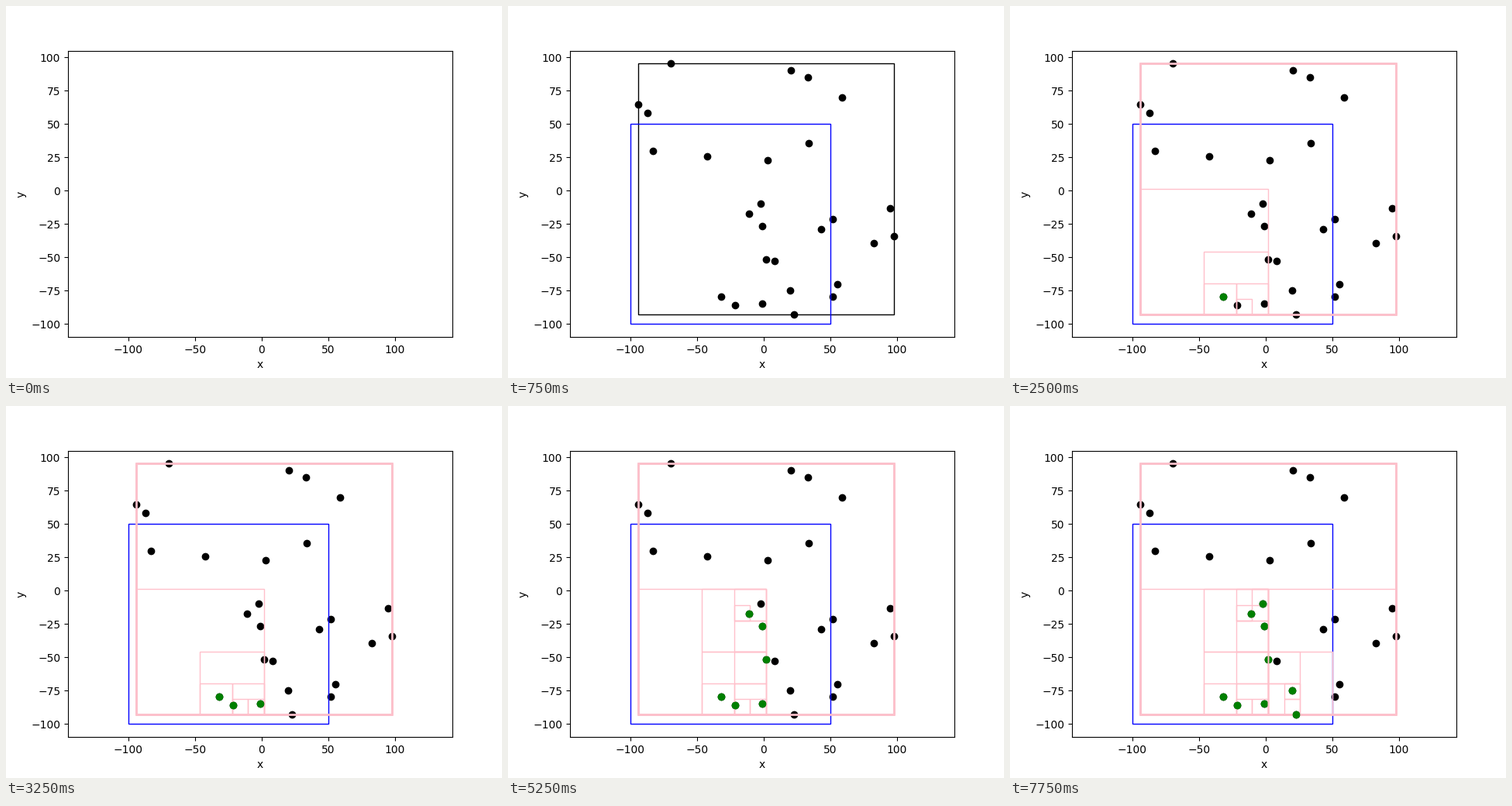
Write a matplotlib script that moves like this. It is 640x480 px and loops after 8 s.

```python
import matplotlib.pyplot as plt
from matplotlib.animation import FuncAnimation
from matplotlib.patches import Rectangle

FRAMES = 32
STEP_MS = 250

POINTS = [
    (-69.5, 95.35), (-94.2, 64.5), (20.6, 90.2), (33.4, 85), (59, 69.9),
    (-87, 58.2), (-82.9, 29.8), (-42.2, 25.6), (3.1, 22.8), (34, 35.5),
    (-2.1, -9.8), (-10.8, -17.3), (-0.9, -26.7), (43.3, -29), (52, -21.4),
    (95, -13.3), (97.9, -34.2), (82.9, -39.5), (1.8, -51.7), (8.4, -52.9),
    (20.1, -74.9), (55.5, -70.3), (52, -79.6), (-31.7, -79.6),
    (-21.2, -86), (-0.9, -84.8), (23, -93),
]
QUERY = (-100, -100, 50, 50)

fig, ax = plt.subplots(figsize=(6.4, 4.8), dpi=100)
ax.set_xlim(-145.24, 143.14)
ax.set_ylim(-109.77, 105.12)
ax.set_xlabel("x")
ax.set_ylabel("y")

steps = []


def next_z():
    return 1 + len(steps) / 200


def add_dots(points, color):
    xs, ys = zip(*points)
    steps.append(ax.scatter(xs, ys, color=color, zorder=next_z()))


def add_box(box, color, width=1):
    x0, y0, x1, y1 = box
    rect = Rectangle((x0, y0), x1 - x0, y1 - y0, fill=False,
                     edgecolor=color, linewidth=width, zorder=next_z())
    steps.append(ax.add_patch(rect))


def overlaps(box):
    return (box[0] <= QUERY[2] and box[2] >= QUERY[0]
            and box[1] <= QUERY[3] and box[3] >= QUERY[1])


def in_query(p):
    return QUERY[0] <= p[0] <= QUERY[2] and QUERY[1] <= p[1] <= QUERY[3]


def search(box, points, width=1):
    """Visit a quadtree node, then its non-empty children from SW to NE."""
    if not points or not overlaps(box) or len(steps) >= FRAMES:
        return
    add_box(box, "pink", width)
    if len(points) == 1:
        if in_query(points[0]):
            add_dots(points, "green")
        return
    x0, y0, x1, y1 = box
    mx, my = (x0 + x1) / 2, (y0 + y1) / 2
    for top in (False, True):
        for right in (False, True):
            child = (mx if right else x0, my if top else y0,
                     x1 if right else mx, y1 if top else my)
            inside = [p for p in points
                      if (p[0] > mx) == right and (p[1] > my) == top]
            search(child, inside)


xs, ys = zip(*POINTS)
bounds = (min(xs), min(ys), max(xs), max(ys))
add_dots(POINTS, "black")
add_box(bounds, "black")
add_box(QUERY, "blue")
search(bounds, POINTS, width=2)


def draw(frame):
    for i, artist in enumerate(steps):
        artist.set_visible(i < frame)
    return steps


anim = FuncAnimation(fig, draw, frames=FRAMES, interval=STEP_MS,
                     repeat=True, repeat_delay=0, blit=False)
plt.show()
```
